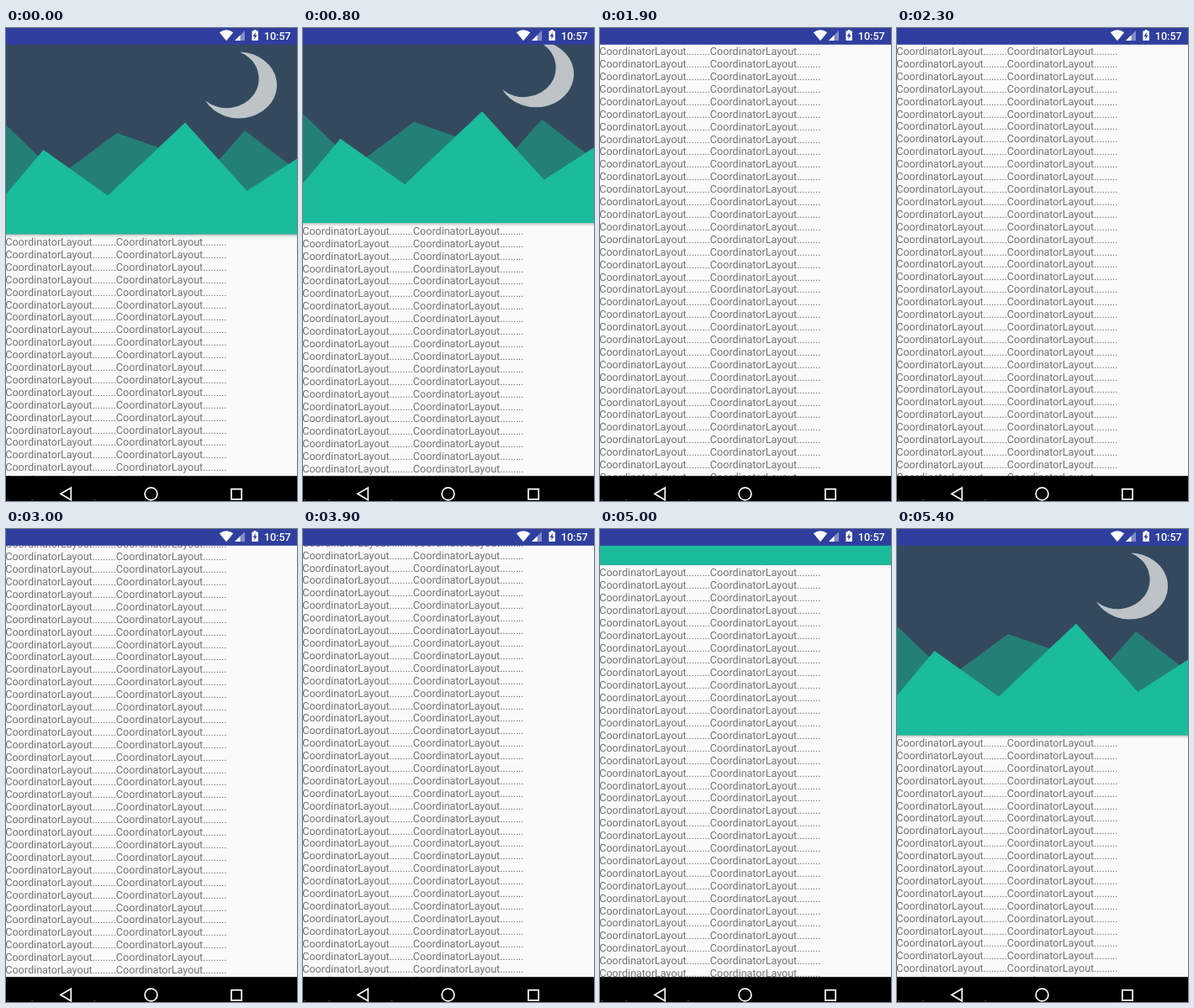
These frames come from a looping animation (346x563 px, 6700 ms). An HTML page with a canvas:

```html
<!DOCTYPE html>
<html lang="en">
<head>
<meta charset="utf-8">
<title>Collapsing header</title>
<style>
  html, body { margin: 0; width: 100%; height: 100%; overflow: hidden; background: #fafafa; }
  canvas { display: block; width: 346px; height: 563px; }
</style>
</head>
<body>
<canvas id="stage"></canvas>
<script>
const W = 346, H = 563, LOOP = 6700, STEP = 100;
const TOP = 19.8, NAV = 533.2, HEADER_END = 245.5;
const FONT = 'Roboto, sans-serif';
const UNIT = W / 768;              // stage pixels per device pixel
const LINES = 54, PITCH = 14.905, BASELINE = 259;
const LINE = 'CoordinatorLayout.........'.repeat(2);

// Each swipe eases the scroll offset on to a new value.
const SWIPES = [
  { start: 700, end: 1352, to: 207.3 },
  { start: 1800, end: 2400, to: 470 },
  { start: 2800, end: 3000, to: 519.9 },
  { start: 3826, end: 4400, to: 226.4 },
  { start: 4900, end: 5400, to: 0 }
];

const canvas = document.getElementById('stage');
const ctx = canvas.getContext('2d');
const dpr = window.devicePixelRatio || 1;
canvas.width = W * dpr;
canvas.height = H * dpr;
ctx.scale(dpr, dpr);
ctx.textRendering = 'geometricPrecision';

// Glyph advances are whole device pixels, as with hinted text.
ctx.font = `28px ${FONT}`;
let pen = 0;
const glyphs = [...LINE].map(ch => {
  const x = pen * UNIT - 0.7;
  pen += Math.round(ctx.measureText(ch).width);
  return [ch, x];
});

const MOON = new Path2D(
  'M278 28.5A45.2 39.5 0 1 1 237 86.5A38.3 34.9 0 1 0 278 28.5Z');

function smooth(p) {
  p = Math.min(1, Math.max(0, p));
  return p * p * (3 - 2 * p);
}

function scrollAt(t) {
  return SWIPES.reduce((pos, { start, end, to }) =>
    pos + (to - pos) * smooth((t - start) / (end - start)), 0);
}

function rect(color, x, y, w, h) {
  ctx.fillStyle = color;
  ctx.fillRect(x, y, w, h);
}

function trace(points) {
  ctx.beginPath();
  points.forEach(([x, y]) => ctx.lineTo(x, y));
  ctx.closePath();
}

function poly(color, ...points) {
  trace(points);
  ctx.fillStyle = color;
  ctx.fill();
}

// A peak with its left and right slopes, reaching down to the header's end.
function mountain(x, y, left, right) {
  const half = 90;
  poly('#248076', [x, y], [x + half, y + half * right], [x + half, HEADER_END],
    [x - half, HEADER_END], [x - half, y + half * left]);
}

function drawText(scroll) {
  ctx.font = `${28 * UNIT}px ${FONT}`;
  ctx.fillStyle = 'rgba(0,0,0,.54)';
  for (let i = 0; i < LINES; i++) {
    const y = Math.round(BASELINE + i * PITCH - scroll);
    if (y < TOP - 5 || y > NAV + 12) continue;
    for (const [ch, x] of glyphs) ctx.fillText(ch, x, y);
  }
}

function drawHeader(scroll) {
  const end = HEADER_END - scroll;
  if (end <= TOP) return;
  const shade = ctx.createLinearGradient(0, end, 0, end + 4);
  shade.addColorStop(0, `rgba(0,0,0,${0.22 * end / HEADER_END})`);
  shade.addColorStop(1, 'rgba(0,0,0,0)');
  rect(shade, 0, end, W, 4);

  ctx.save();
  ctx.translate(0, -scroll);
  ctx.beginPath();
  ctx.rect(0, 0, W, HEADER_END);
  ctx.clip();
  rect('#34495e', 0, 0, W, HEADER_END);
  ctx.fillStyle = '#bdc3c7';
  ctx.fill(MOON);
  mountain(0, 115.5, 1, 0.96);
  mountain(132, 125, 0.74, 0.35);
  mountain(284, 122, 1.13, 0.77);
  poly('#1abc9c', [0, 198], [44.5, 145], [121, 199.5], [213, 112.5],
    [286.5, 194], [W, 155.5], [W, HEADER_END], [0, HEADER_END]);
  ctx.restore();
}

function drawStatusBar() {
  const bar = '#303f9f';
  rect(bar, 0, 0, W, TOP);
  ctx.fillStyle = '#fff';
  ctx.beginPath();
  ctx.moveTo(262, 15.3);
  ctx.lineTo(253.8, 5.2);
  ctx.quadraticCurveTo(262, -0.6, 270.2, 5.2);
  ctx.fill();
  poly('rgba(255,255,255,.4)', [284, 3], [284, 15], [272, 15]);
  poly('#fff', [278.5, 8.5], [278.5, 15], [272, 15]);
  rect('#fff', 294.6, 2.2, 3, 2);
  rect('#fff', 292.4, 3.5, 7.4, 11.4);
  poly(bar, [296.7, 5], [293.6, 10], [295.6, 10], [295.2, 13.6], [298.5, 8.4], [296.5, 8.4]);
  ctx.font = `500 12.6px ${FONT}`;
  ctx.fillStyle = '#fff';
  ctx.fillText('10:57', 306.8, 14);
}

function drawNavBar() {
  rect('#000', 0, NAV, W, H - NAV);
  for (const x of [1, 30, 104]) rect('#333', x, 561, 2.5, 1.5);
  ctx.strokeStyle = '#fff';
  ctx.lineWidth = 1.7;
  trace([[65, 554.5], [77.3, 547.2], [77.3, 561.8]]);
  ctx.stroke();
  ctx.beginPath();
  ctx.arc(172.5, 554.5, 7.4, 0, 2 * Math.PI);
  ctx.stroke();
  ctx.strokeRect(267.9, 548.8, 12.2, 12.2);
}

function draw(scroll) {
  rect('#fafafa', 0, 0, W, H);
  drawText(scroll);
  drawHeader(scroll);
  drawStatusBar();
  drawNavBar();
}

const start = performance.now();
let shown = -1;
function tick() {
  const t = (performance.now() - start) % LOOP;
  const scroll = scrollAt(Math.floor(t / STEP) * STEP);
  if (scroll !== shown) draw(shown = scroll);
  requestAnimationFrame(tick);
}
tick();
</script>
</body>
</html>
```
